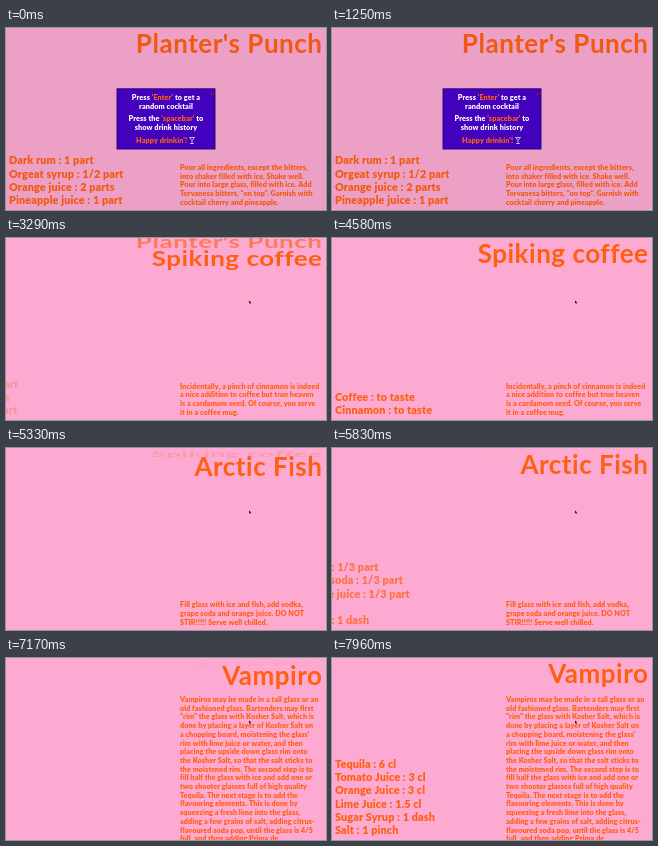
Animation, 320 px wide and 182 px high, one loop 8 s. Source, as an HTML page with a canvas:

```html
<!DOCTYPE html>
<html lang="en">
<head>
<meta charset="utf-8">
<title>Cocktail recipes</title>
<style>
html, body { margin: 0; width: 100%; height: 100%; overflow: hidden; background: #fcaad1; }
canvas { display: block; width: 320px; height: 182px; }
</style>
</head>
<body>
<canvas id="stage"></canvas>
<script>
const W = 320, H = 182, LOOP = 8000, STEP = 800, SLIDE = 150;
const PINK = '#fcaad1', ORANGE = '#ff5f10', PURPLE = '#4300bd';
const canvas = document.getElementById('stage');
const ctx = canvas.getContext('2d');
const dpr = window.devicePixelRatio || 1;
canvas.width = W * dpr;
canvas.height = H * dpr;

const drinks = [
  {
    start: -2000,
    title: "Planter's Punch",
    parts: ['Dark rum : 1 part', 'Orgeat syrup : 1/2 part', 'Orange juice : 2 parts', 'Pineapple juice : 1 part'],
    steps: ['Pour all ingredients, except the bitters,', 'into shaker filled with ice. Shake well.',
      'Pour into large glass, filled with ice. Add', 'Torvanesa bitters, "on top". Garnish with',
      'cocktail cherry and pineapple.']
  },
  {
    start: 2960,
    title: 'Spiking coffee',
    parts: ['Coffee : to taste', 'Cinnamon : to taste'],
    steps: ['Incidentally, a pinch of cinnamon is indeed', 'a nice addition to coffee but true heaven',
      'is a cardamom seed. Of course, you serve', 'it in a coffee mug.']
  },
  {
    start: 4670,
    title: 'Arctic Fish',
    parts: ['Vodka : 1/3 part', 'Grape soda : 1/3 part', 'Orange juice : 1/3 part', 'Ice', 'Fishes : 1 dash'],
    steps: ['Fill glass with ice and fish, add vodka,', 'grape soda and orange juice. DO NOT',
      'STIR!!!!! Serve well chilled.']
  },
  {
    start: 6222,
    title: 'Vampiro',
    parts: ['Tequila : 6 cl', 'Tomato Juice : 3 cl', 'Orange Juice : 3 cl', 'Lime Juice : 1.5 cl',
      'Sugar Syrup : 1 dash', 'Salt : 1 pinch'],
    top: 44,
    steps: ['Vampiros may be made in a tall glass or an', 'old fashioned glass. Bartenders may first',
      '"rim" the glass with Kosher Salt, which is', 'done by placing a layer of Kosher Salt on',
      "a chopping board, moistening the glass'", 'rim with lime juice or water, and then',
      'placing the upside down glass rim onto', 'the Kosher Salt, so that the salt sticks to',
      'the moistened rim. The second step is to', 'fill half the glass with ice and add one or',
      'two shooter glasses full of high quality', 'Tequila. The next stage is to add the',
      'flavouring elements. This is done by', 'squeezing a fresh lime into the glass,',
      'adding a few grains of salt, adding citrus-', 'flavoured soda pop, until the glass is 4/5',
      'full, and then adding Prima de']
  }
];

const clamp = v => Math.min(1, Math.max(0, v));
const cubic = (a, b, u) => 3 * a * u * (1 - u) ** 2 + 3 * b * u * u * (1 - u) + u ** 3;

// Same curve as the CSS "ease" keyword
function ease(x) {
  x = clamp(x);
  let lo = 0, hi = 1;
  for (let i = 0; i < 24; i++) {
    const mid = (lo + hi) / 2;
    if (cubic(0.25, 0.25, mid) < x) lo = mid; else hi = mid;
  }
  return cubic(0.1, 1, hi);
}

function track(keys, t) {
  for (let i = 1; i < keys.length; i++) {
    const [t0, v0] = keys[i - 1], [t1, v1] = keys[i];
    if (t < t1) return v0 + (v1 - v0) * clamp((t - t0) / (t1 - t0));
  }
  return keys[keys.length - 1][1];
}

function setFont(size, weight = 900, spacing = 0.01) {
  ctx.font = `${weight} ${size}px Lato, "Open Sans", sans-serif`;
  ctx.letterSpacing = `${size * spacing}px`;
}

function drawTitle(text, base, scale, alpha) {
  if (scale < 0.01 || alpha < 0.01) return;
  ctx.save();
  ctx.globalAlpha = alpha;
  ctx.translate(316.5, base);
  ctx.scale(1, scale);
  setFont(26, 700, 0.02);
  ctx.textAlign = 'right';
  ctx.fillText(text, 0, 0);
  ctx.restore();
}

function drawLines(lines, x, top, gap) {
  lines.forEach((line, i) => ctx.fillText(line, x, top + i * gap));
}

function drawParts(drink, shown) {
  if (shown < 0.01) return;
  ctx.globalAlpha = shown;
  setFont(10.85);
  drawLines(drink.parts, 3 - SLIDE * (1 - shown), 176 - (drink.parts.length - 1) * 13.25, 13.25);
  ctx.globalAlpha = 1;
}

function drawSteps({ steps, top }) {
  const gap = 8.7;
  setFont(7.2);
  drawLines(steps, 174, top ?? 176.7 - (steps.length - 1) * gap, gap);
}

const oldBase = [[0, 24.5], [148, 20], [330, 10], [660, 9.5], [1600, 6]];
const newBase = [[0, 19], [148, 21], [330, 28], [660, 28], [1600, 24.5]];

function drawRecipe(t) {
  const i = drinks.findLastIndex(d => t >= d.start);
  const now = drinks[i], prev = drinks[i - 1];
  const age = t - now.start;
  ctx.fillStyle = ORANGE;
  if (prev) {
    const left = 1 - ease(age / (2 * STEP));
    drawTitle(prev.title, track(oldBase, age), left, left ** 1.3);
    drawParts(prev, 1 - ease(age / STEP));
  }
  drawTitle(now.title, track(newBase, age), ease(age / 680), 1);
  drawParts(now, ease((age - STEP) / STEP));
  drawSteps(now);
}

// Text between bars is orange
function drawCentered(text, y) {
  const runs = text.split('|');
  let x = 160 - ctx.measureText(runs.join('')).width / 2;
  runs.forEach((run, i) => {
    ctx.fillStyle = i % 2 ? ORANGE : '#fff';
    ctx.fillText(run, x, y);
    x += ctx.measureText(run).width;
  });
}

function strokePath(points, color, width) {
  ctx.beginPath();
  points.forEach(([x, y, move]) => move ? ctx.moveTo(x, y) : ctx.lineTo(x, y));
  ctx.strokeStyle = color;
  ctx.lineWidth = width;
  ctx.stroke();
}

function drawDialog(alpha) {
  if (alpha <= 0) return;
  ctx.globalAlpha = alpha;
  ctx.fillStyle = 'rgba(0, 0, 0, .06)';
  ctx.fillRect(0, 0, W, H);
  ctx.fillStyle = PURPLE;
  ctx.fillRect(111, 60.5, 98, 60.5);
  ctx.strokeStyle = '#2b0a80';
  ctx.lineWidth = 1;
  ctx.strokeRect(111, 61, 98, 60);
  setFont(7.3);
  drawCentered("Press |'Enter'| to get a", 71.8);
  drawCentered('random cocktail', 80.7);
  drawCentered("Press the |'spacebar'| to", 93.2);
  drawCentered('show drink history', 102.1);
  ctx.fillStyle = ORANGE;
  ctx.fillText("Happy drinkin'!", 130, 114.6);
  strokePath([[183.5, 109.5, 1], [188.5, 109.5], [186, 112.3], [183.5, 109.5],
    [186, 112.3, 1], [186, 115.5], [184.2, 115.5, 1], [187.8, 115.5]], '#e6dcf5', 0.8);
  strokePath([[204.8, 65.3, 1], [208, 68.5], [208, 65.3, 1], [204.8, 68.5]], '#e02a35', 0.8);
  ctx.globalAlpha = 1;
}

function drawCursor(t) {
  const p = ease((t - 1640) / 500);
  ctx.save();
  ctx.translate(206 + 37 * p, 66 - 3.5 * p);
  ctx.beginPath();
  ctx.moveTo(0, 0);
  ctx.lineTo(0, 3);
  ctx.lineTo(0.8, 2.4);
  ctx.lineTo(1.4, 3.5);
  ctx.lineTo(1.8, 3.2);
  ctx.lineTo(1.3, 2.2);
  ctx.lineTo(2.2, 2.1);
  ctx.closePath();
  ctx.fillStyle = '#1c1218';
  ctx.fill();
  ctx.restore();
}

function draw(t) {
  ctx.setTransform(dpr, 0, 0, dpr, 0, 0);
  ctx.fillStyle = PINK;
  ctx.fillRect(0, 0, W, H);
  drawRecipe(t);
  drawDialog(1 - ease((t - 1600) / 500));
  drawCursor(t);
}

const begin = performance.now();
function frame() {
  draw((performance.now() - begin) % LOOP);
  requestAnimationFrame(frame);
}
frame();
</script>
</body>
</html>
```
